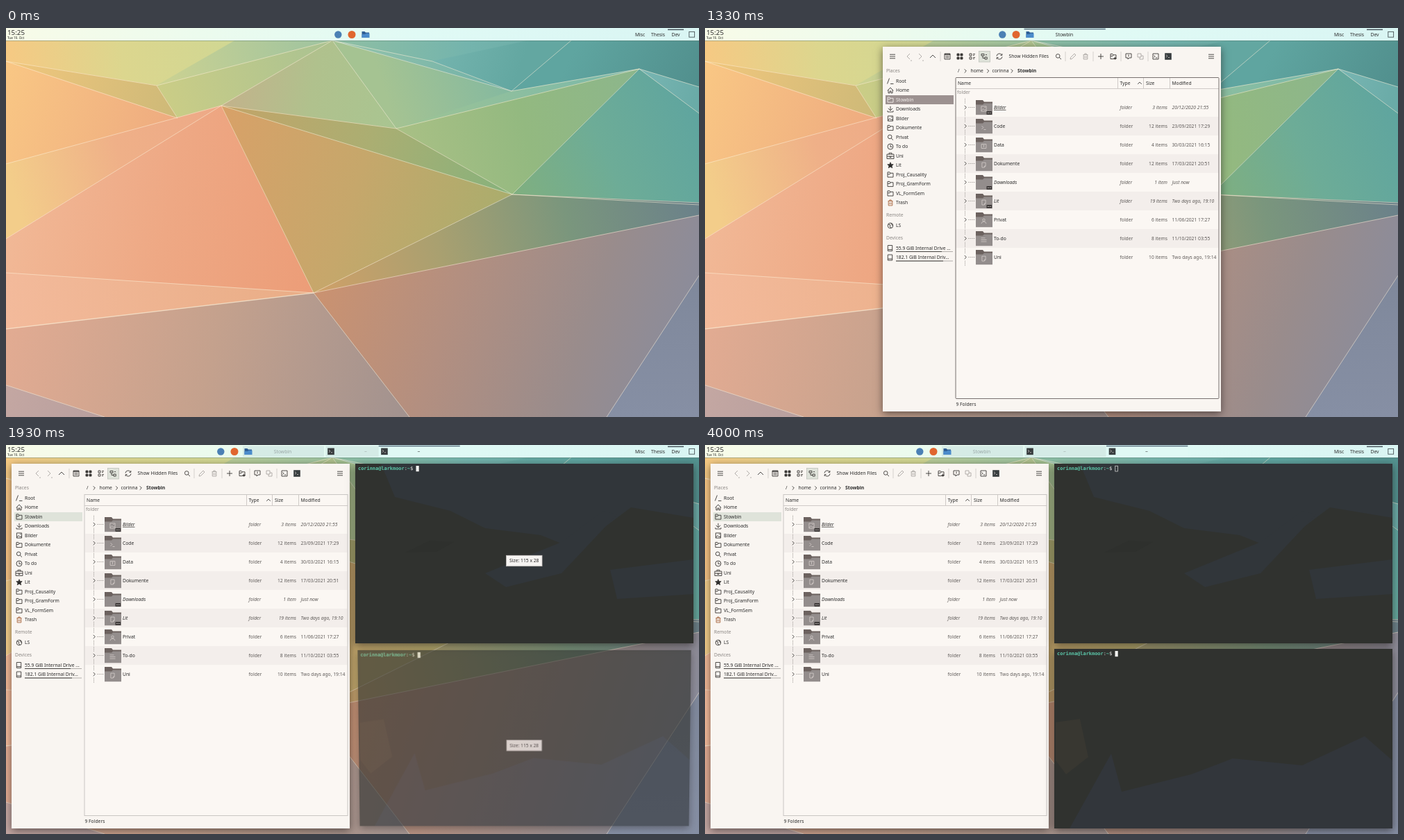
Recreate the animation shown at these times as an HTML page. Size 998x561 px, loop 4.14 s.

```html
<!DOCTYPE html>
<html lang="en">
<head>
<meta charset="utf-8">
<title>Tiling desktop</title>
<style>
  :root {
    --away: perspective(486px) translateZ(-18px) rotateX(-2.6deg);
    --rest: perspective(486px) translateZ(0) rotateX(0deg);
  }
  html, body { margin: 0; width: 100%; height: 100%; overflow: hidden; }
  body { position: relative; background: #b8a080; }
  svg { position: absolute; left: 0; top: 0; width: 100%; height: 100%; display: block; }
  text { font: 6.75px "Noto Sans", "Open Sans", sans-serif; fill: #2b2b2b; white-space: pre; }
  #stage { position: absolute; left: 0; top: 0; width: 998px; height: 561px; overflow: hidden; }
  #panel { height: 19px; }

  .win { position: absolute; width: 487px; box-shadow: 0 3px 11px rgba(30, 25, 25, .6); }
  #files { left: 8px; top: 27px; height: 526px; background: #f9f5f1; }
  .term { left: 503px; height: 259px; background: #30322f; }
  #term1 { top: 27px; }
  #term2 { top: 294px; }
  .term text { font-family: "DejaVu Sans Mono", "Noto Sans Mono", monospace; font-size: 6.93px; fill: #f0f0ee; }
  .term .tip text { font: 6.75px "Noto Sans", sans-serif; fill: #2b2b2b; }
  .user { font-weight: bold; fill: #5cc9ab; }

  .grey { fill: #8b8784; }
  .dim { fill: #5f5b59; }
  .it { font-style: italic; }
  .bold { font-weight: bold; }
  .line { fill: none; stroke: #3a3836; stroke-width: .9; }
  .pale { stroke: #aaa5a2; }
  .glyph { fill: none; stroke: #d6cfcc; stroke-width: .8; }

  /* --on is 1 while a task or window is the active one */
  .on { opacity: var(--on); }
  .off { opacity: calc(1 - var(--on)); }

  #files { --on: 0; animation: files 4140ms linear infinite, focus1 4140ms step-end infinite; }
  #term1 { --on: 0; animation: term1 4140ms linear infinite, focus2 4140ms step-end infinite; }
  #term2 { --on: 1; animation: term2 4140ms linear infinite; }
  #late { animation: late 4140ms step-end infinite; }
  #term1 .tip { animation: tip1 4140ms step-end infinite; }
  #term2 .tip { animation: tip2 4140ms step-end infinite; }
  #strip { animation: strip 4140ms linear infinite; }
  #task0 { --on: 0; animation: open 4140ms step-end infinite, task1 4140ms step-end infinite; }
  #task1 { --on: 0; animation: slide1 4140ms linear infinite, task2 4140ms step-end infinite; }
  #task2 { --on: 1; animation: slide2 4140ms linear infinite; }

  @keyframes files {
    0%, 21.328% { opacity: 0; transform: translateX(248px) var(--away); }
    21.329% { opacity: .4; transform: translateX(248px) var(--away); }
    25.193%, 32.68% { opacity: 1; transform: translateX(248px) var(--rest); }
    32.681%, 100% { opacity: 1; transform: translateX(0) var(--rest); }
  }
  @keyframes term1 {
    0%, 32.68% { opacity: 0; transform: var(--away); }
    32.681% { opacity: .4; transform: var(--away); }
    36.546%, 100% { opacity: 1; transform: var(--rest); }
  }
  @keyframes term2 {
    0%, 44.951% { opacity: 0; transform: var(--away); }
    44.952% { opacity: .4; transform: var(--away); }
    48.816%, 100% { opacity: 1; transform: var(--rest); }
  }
  @keyframes strip {
    0% { transform: translateX(169px); }
    14.493% { transform: translateX(169px); animation-timing-function: ease-out; }
    19.324%, 32.366% { transform: translateX(119px); }
    32.367%, 44.033% { transform: translateX(60px); }
    44.034%, 100% { transform: translateX(0); }
  }
  @keyframes slide1 {
    0%, 32.366% { opacity: 0; transform: translateX(-59px); }
    32.367% { opacity: 1; transform: translateX(-59px); animation-timing-function: cubic-bezier(.25, .46, .45, .94); }
    39.13%, 44.033% { opacity: 1; transform: translateX(59px); }
    44.034%, 100% { opacity: 1; transform: translateX(0); }
  }
  @keyframes slide2 {
    0%, 44.033% { opacity: 0; transform: translateX(-118px); }
    44.034% { opacity: 1; transform: translateX(-118px); animation-timing-function: cubic-bezier(.25, .46, .45, .94); }
    50.797%, 100% { opacity: 1; transform: translateX(0); }
  }
  @keyframes open { 0% { opacity: 0; } 16.9% { opacity: 1; } }
  @keyframes late { 0% { opacity: 0; } 27.295% { opacity: 1; } }
  @keyframes tip1 { 0% { opacity: 1; } 59.66%, 100% { opacity: 0; } }
  @keyframes tip2 { 0% { opacity: 1; } 69.324%, 100% { opacity: 0; } }
  @keyframes task1 { 0% { --on: 1; } 32.367% { --on: 0; } }
  @keyframes task2 { 0% { --on: 1; } 44.034% { --on: 0; } }
  @keyframes focus1 { 0% { --on: 1; } 36.957% { --on: 0; } }
  @keyframes focus2 { 0% { --on: 1; } 48.07% { --on: 0; } }
</style>
</head>
<body>
<div id="stage">
  <svg id="wall" viewBox="0 0 998 561"></svg>
  <div class="win" id="files"><svg viewBox="8 27 487 526"></svg></div>
  <div class="win term" id="term1"><svg viewBox="503 27 487 259"></svg></div>
  <div class="win term" id="term2"><svg viewBox="503 294 487 259"></svg></div>
  <svg id="panel" viewBox="0 0 998 19"></svg>
</div>
<script>
const USER = 'corinna', HOST = 'larkmoor', FOLDER = 'Stowbin';

const fill = (query, html) => { document.querySelector(query).innerHTML = html; };
// Text with its middle at y.
const text = (x, y, s, cls = '', more = '') =>
  `<text x="${x}" y="${y + 2.4}" class="${cls}" ${more}>${s}</text>`;
const rect = (x, y, w, h, color, more = '') =>
  `<rect x="${x}" y="${y}" width="${w}" height="${h}" fill="${color}" ${more}/>`;
const path = (d, cls = 'line', more = '') => `<path d="${d}" class="${cls}" ${more}/>`;
const icon = (x, y, d, cls = 'line', more = '') =>
  path(d, cls, `transform="translate(${x} ${y})" ${more}`);

// Wallpaper: facets between named corners
const corner = {
  a: [310, 112], b: [443, 382], c: [729, 240], d: [562, 145], e: [912, 59], f: [470, 18],
  g: [247, 130], h: [217, 83], i: [0, 48], j: [0, 196], k: [0, 304], l: [0, 353],
  m: [0, 434], n: [0, 515], o: [142, 561], p: [581, 561], q: [865, 561], r: [998, 357],
  s: [998, 270], t: [998, 252], u: [998, 123], v: [998, 85], w: [728, 91], x: [614, 48],
  y: [0, 0], z: [998, 0], A: [998, 561], B: [0, 561], C: [330, 18], D: [835, 0]
};
let shades = 0;
function facet(shape, axis, ...colors) {
  const id = 'shade' + shades++;
  const [[x1, y1], [x2, y2]] = [...axis].map(k => corner[k]);
  const stops = colors.map((c, i) => `<stop offset="${i / (colors.length - 1)}" stop-color="${c}"/>`).join('');
  const points = [...shape].map(k => corner[k]).join(' ');
  return `<linearGradient id="${id}" gradientUnits="userSpaceOnUse" x1="${x1}" y1="${y1}" x2="${x2}" y2="${y2}">${stops}</linearGradient>
    <polygon points="${points}" fill="url(#${id})" stroke="url(#${id})" stroke-width=".6"/>`;
}
const edges = 'aj ak ab ac ad dc de ec bc bs bl bm bp no rq ct ev eu ew fw fd fa ig ih hg hf xw xf wD'
  .split(' ').map(([p, q]) => `M${corner[p]}L${corner[q]}`).join('');

fill('#wall',
  facet('yzAB', 'yz', '#e8d48a', '#a3c79c', '#74b4ad', '#5a9c98') +
  facet('yChi', 'iC', '#f6c983', '#dcd68e', '#d0d793') +
  facet('Cfh', 'hf', '#cdd291', '#9dc3a0') +
  facet('hfag', 'hf', '#cbcd86', '#a9c292') +
  facet('afd', 'ad', '#c3b28b', '#b0c18d', '#a9c591') +
  facet('fwd', 'dw', '#a5c392', '#84b9a0') +
  facet('fxw', 'fw', '#96c4ac', '#6fb0a8') +
  facet('xDw', 'xw', '#74b4ae', '#63a7a1') +
  facet('DzvewD', 'Dv', '#5fa5a0', '#518f8d') +
  facet('dwe', 'de', '#a0c493', '#78b8ac') +
  facet('dec', 'de', '#a9c085', '#93b980', '#8cb68c') +
  facet('ectu', 'cu', '#80af7f', '#6dac97', '#5fa59f') +
  facet('evu', 'ev', '#79b6b3', '#6aaba7') +
  facet('ihg', 'ig', '#f1c77d', '#cdb978') +
  facet('igj', 'ig', '#f9c784', '#eeab80') +
  facet('jak', 'ja', '#f3cd8a', '#efb088', '#eda987') +
  facet('aklb', 'kb', '#f1b896', '#eea884', '#ec9d78') +
  facet('abc', 'ac', '#d8a168', '#c6a76b', '#aaad6d') +
  facet('acd', 'ac', '#c3a468', '#abae72', '#86b27c') +
  facet('bcts', 'bt', '#d0a068', '#a9a070', '#7a967d', '#6b818a') +
  facet('bsAp', 'bA', '#cb9270', '#b38f80', '#998c8c', '#858ca1') +
  facet('rAq', 'rA', '#7f889b', '#868fa4') +
  facet('blm', 'mb', '#f3ba9b', '#e9ad86') +
  facet('bmnop', 'mp', '#e2ab92', '#c4a18d', '#a1928f') +
  facet('noB', 'no', '#c4a7a2', '#b79f9e') +
  path(edges + 'M729 240L998 255', '', 'fill="none" stroke="#fff0d8" stroke-opacity=".52"') +
  path('M0 434L443 382', '', 'fill="none" stroke="#fff0d8" stroke-opacity=".4" stroke-width="1.6"'));

// Small icons drawn around 0,0
const I = {
  root: 'M-4.5 4L-1.5-4M0 4H4.5',
  home: 'M-4.2 .3L0-4L4.2 .3M-3-.6V3.8H-.9V1H.9V3.8H3V-.6',
  folder: 'M-4 3.6V-3.6H-1L0-2.2H4V3.6ZM-4-.6H-.8L0-2.2',
  down: 'M0-4.2V2M-3.2-1.2L0 2L3.2-1.2M-4 2.2V4H4V2.2',
  image: 'M-3.6-3.6H3.6V3.6H-3.6ZM-3.4 3L-1 0L1 2L2 1L3.4 3M1-2H2.4',
  search: 'M2-.6A2.8 2.8 0 1 1-3.6-.6A2.8 2.8 0 1 1 2-.6M1.2 1.4L4 4.2',
  clock: 'M4 0A4 4 0 1 1-4 0A4 4 0 1 1 4 0M0-2.6V.4H2.6',
  brief: 'M-5-2.4H5V4H-5ZM-2-2.4V-4.2H2V-2.4M-5 .6H5M-1 .6V2H1V.6',
  star: 'M0-4.2L1.2-1.3L4.2-1.2L1.9 .8L2.7 3.8L0 2.1L-2.7 3.8L-1.9 .8L-4.2-1.2L-1.2-1.3Z',
  trash: 'M-3.4-2.4H3.4M-2.8-2.4V4H2.8V-2.4M-1.2-2.6V-4H1.2V-2.6M-1-.5V2.4M1-.5V2.4',
  globe: 'M3.8 0A3.8 3.8 0 1 1-3.8 0A3.8 3.8 0 1 1 3.8 0M-3-2L0-1L-1 1L1 3M1-3.4L3 0',
  drive: 'M-3.2-4H3.2V4H-3.2ZM-3.2 2H3.2',
  menu: 'M-4-2.8H4M-4 0H4M-4 2.8H4',
  left: 'M2-4L-2 0L2 4', right: 'M-2-4L2 0L-2 4', up: 'M-4 2L0-2L4 2', next: 'M-1.3-2.6L1.3 0L-1.3 2.6',
  sheet: 'M-4-4H4V4H-4ZM-4-2.6H4M-4-3.3H4M-2.5-.4H2.5M-2.5 1.8H2.5',
  grid: 'M-4-4H-1V-1H-4ZM1-4H4V-1H1ZM-4 1H-1V4H-4ZM1 1H4V4H1Z',
  list: 'M-4-4H-1V-1H-4ZM-4 1H-1V4H-4ZM1-3.4H4M1-1.6H3M1 1.6H4M1 3.4H3',
  tree: 'M-4-3.6H0V-1H-4ZM1 1H4.2V4H1ZM-2-1V2.4H1M2-2.4H4',
  reload: 'M-4-.5A4 4 0 0 1 3.5-2M4 .5A4 4 0 0 1-3.5 2M3.8-4V-1.6H1.4M-3.8 4V1.6H-1.4',
  pen: 'M-4 4L-3.4 1.4L2-4L4-2L-1.4 3.4Z', plus: 'M-4 0H4M0-4V4',
  note: 'M-4-4H4V2H1L-1 4V2H-4ZM0-2.6V.4', copy: 'M-4-4H1V1H-4ZM-1 1V4H4V-1H1',
  shell: 'M-4-4H4V4H-4ZM-2.4-1.6L-.8 0L-2.4 1.6M0 2H2.4',
  page: 'M-2.6-3.4H2.6V1.6L.8 3.6H-2.6ZM2.6 1.6H.8V3.6', prompt: 'M-3-2.4L-.6 0L-3 2.4M0 3H3',
  box: 'M-3.4-3H3.4V3H-3.4ZM-1-1.4H1M0-1.4V1.6', rows: 'M-4-2.6H2M-4 0H4M-4 2.6H4',
  person: 'M1.7-1.7A1.7 1.7 0 1 1-1.7-1.7A1.7 1.7 0 1 1 1.7-1.7M-3.6 3.6L-1.8 .8H1.8L3.6 3.6'
};
const konsole = (x, y) => rect(x - 4.8, y - 4.8, 9.6, 9.6, '#383d3f') +
  icon(x - 1, y - .5, 'M-2-1.8L0 0L-2 1.8M1 2H3', 'glyph', 'stroke-width=".6"');

// File manager
const tools = [[22, 'menu'], [45, 'left', 1], [62, 'right', 1], [80, 'up'], [101, 'sheet'], [119, 'grid'],
  [137, 'list'], [154, 'tree'], [176, 'reload'], [261, 'search'], [282, 'pen', 1], [300, 'trash', 1],
  [322, 'plus'], [340, 'folder'], [362, 'note'], [379, 'copy', 1], [401, 'shell'], [481, 'menu']];
const toolbar = rect(146.5, 33.5, 16, 15.5, '#dfe3da', 'stroke="#b9bcb5" stroke-width=".7"') +
  tools.map(([x, name, off]) => icon(x, 41, I[name], off ? 'line pale' : 'line')).join('') +
  icon(119, 41, I.grid, '', 'fill="#3a3836"') + icon(342.5, 43.5, 'M0-2V2M-2 0H2') + konsole(419, 41) +
  [91, 271, 311, 351, 390].map(x => path(`M${x} 34V48`, 'line pale', 'opacity=".5"')).join('') +
  path('M48 47h2M65 47h2', 'line pale') + text(189.5, 41, 'Show Hidden Files');

const places = [['Root', 'root'], ['Home', 'home'], [FOLDER, 'folder'], ['Downloads', 'down'], ['Bilder', 'image'],
  ['Dokumente', 'folder'], ['Privat', 'search'], ['To do', 'clock'], ['Uni', 'brief'], ['Lit', 'star'],
  ['Proj_Causality', 'folder'], ['Proj_GramForm', 'folder'], ['VL_FormSem', 'folder'], ['Trash', 'trash']];
const place = ([name, kind], i) => {
  const y = 76.5 + 13.5 * i;
  const mark = cls => icon(19, y, I[kind], cls);
  if (i === 2) return `<g class="off">${rect(12, y - 6.5, 98, 13, '#dfe3da')}${mark('line')}${text(27, y, name)}</g>
    <g class="on">${rect(12, y - 6.5, 98, 13, '#9c9190')}${icon(19, y, I[kind], 'line', 'style="stroke:#f6f1ee"')}
    ${text(27, y, name, '', 'style="fill:#f6f1ee"')}</g>`;
  const paint = kind === 'star' ? 'style="fill:#2b2b2b"' : kind === 'trash' ? 'style="stroke:#a5643a"' : '';
  return icon(19, y, I[kind], 'line', paint) + text(27, y, name);
};
const drive = (y, name, used) => icon(18.5, y, I.drive) + text(27, y, name) +
  path(`M27 ${y + 5}H109`, 'line pale') + path(`M27 ${y + 5}H${used}`);
const sidebar = text(13, 62, 'Places', 'grey') + places.map(place).join('') +
  text(13, 270, 'Remote', 'grey') + icon(19, 285, I.globe) + text(27, 285, 'LS') +
  text(13, 303, 'Devices', 'grey') + drive(317.5, '55.9 GiB Internal Drive ...', 93) +
  drive(331, '182.1 GiB Internal Driv...', 95);

const crumbs = text(116, 62, '/') + text(134.5, 62, 'home') + text(165.5, 62, USER) +
  text(202, 62, FOLDER, 'bold') + [127, 159.5, 194].map(x => icon(x, 62, I.next)).join('');

const entries = [
  ['Bilder', '3 items', '20/12/2020 21:55', 'image', 1], ['Code', '12 items', '23/09/2021 17:29', 'prompt'],
  ['Data', '4 items', '30/03/2021 16:15', 'box'], ['Dokumente', '12 items', '17/03/2021 20:51', 'page'],
  ['Downloads', '1 item', 'Just now', '', 1], ['Lit', '19 items', 'Two days ago, 19:10', 'page', 1],
  ['Privat', '6 items', '11/06/2021 17:27', 'person'], ['To-do', '8 items', '11/10/2021 03:55', 'rows'],
  ['Uni', '10 items', 'Two days ago, 19:14', 'page']];
const rowY = i => 114.5 + 27 * i;
const entry = ([name, , date, , link], i) => {
  const y = rowY(i), it = link ? 'it' : '';
  return (i % 2 ? rect(114, y - 13.5, 377.5, 27, '#f3eeeb') : '') +
    path(`M126.5 ${y - 13}V${y - 5}M126.5 ${y + 5}V${y + 13}M131 ${y}H141`, 'line pale', 'stroke-dasharray="1 .6"') +
    icon(127, y, I.next) +
    path(`M142 ${y + 4}V${y - 10.5}H152L154 ${y - 8}H166V${y + 4}Z`, '', 'fill="#6c625f"') +
    path(`M142 ${y + 10.8}V${y - 4}H152L154 ${y - 6}H166V${y + 10.8}Z`, '', 'fill="#938d8c"') +
    text(168, y, name, it, i ? '' : 'text-decoration="underline"') +
    text(349.5, y, 'folder', 'dim ' + it) + text(424.5, y, date, 'dim ' + it);
};
const extras = ([, size, , kind, link], i) => {
  const y = rowY(i);
  return (kind ? icon(153.5, y + 2, I[kind], 'glyph') : '') +
    (link ? rect(157.5, y + 5.5, 7.5, 5, '#3f3b3a') + path(`M159 ${y + 8}h1.8m1 0h1.8`, 'glyph', 'stroke-width="1.2"') : '') +
    text(418, y, size, 'dim ' + (link ? 'it' : ''), 'text-anchor="end"');
};
const view = rect(113, 71.5, 379, 463, '#fbf7f3') +
  text(116, 79.5, 'Name') + text(349.5, 79.5, 'Type') + text(387, 79.5, 'Size') + text(424.5, 79.5, 'Modified') +
  icon(378, 79.5, 'M-2.8 1.4L0-1.4L2.8 1.4') +
  path('M346.5 72V87M383.5 72V87M421.5 72V87M113 87.5H492', 'line pale', 'opacity=".6"') +
  text(115, 93, 'folder', 'grey') + entries.map(entry).join('') +
  `<g id="late">${entries.map(extras).join('')}</g>` +
  rect(113, 71.5, 379, 463, 'none', 'class="off" stroke="#c9c6c3"') +
  rect(113, 71.5, 379, 463, 'none', 'class="on" stroke="#77716f" rx="1"');

fill('#files svg', toolbar + sidebar + crumbs + view + text(113.5, 543, '9 Folders'));

// Terminals
const terminal = (y, tipY, tint) => tint +
  `<text x="507" y="${y + 2.4}"><tspan class="user">${USER}@${HOST}</tspan>:<tspan class="user">~</tspan>$</text>` +
  rect(590.5, y - 4, 4.2, 8.2, '#f3f3f1', 'class="on"') +
  rect(590.8, y - 3.8, 3.6, 7.8, 'none', 'class="off" stroke="#e4e4e2" stroke-width=".7"') +
  `<g class="tip">${rect(720.5, tipY - 7.7, 51.5, 15.4, '#f6f4f2', 'stroke="#c8c4c0" stroke-width=".8"')}
  ${text(746.3, tipY, 'Size: 115 x 28', '', 'text-anchor="middle"')}</g>`;
const tint = (d, color) => path(d, '', `fill="${color}"`);
fill('#term1 svg', terminal(34, 167,
  tint('M540 27H990V105L900 90L820 150L770 130L690 120L640 95L560 75Z', '#31363a') +
  tint('M690 185L800 140L860 95L880 100L800 185L720 205Z', '#31363a') +
  tint('M870 180L990 165V215L880 222Z', '#31363a') +
  tint('M575 155L610 138L645 140L620 154Z', '#2e302d')));
fill('#term2 svg', terminal(301, 433.5,
  tint('M525 553L585 445L600 500L700 475L760 452L860 462L950 420L990 455V553Z', '#32363b') +
  tint('M505 400L540 395L552 450L520 475L505 455Z', '#383731')));

// Panel
const task = (id, x, label, mark, bg) => `<g id="${id}">
  ${rect(x, 0, 117.5, 18, bg)}
  <g class="off">${rect(x + .5, 1.5, 117, 15.5, '#cfe6e2', 'opacity=".75"')}${text(x + 58, 9.5, label, '', 'text-anchor="middle" style="fill:#98a6a4"')}</g>
  <g class="on">${rect(x, .8, 117.3, 1.5, '#5c7584')}${text(x + 58, 9.5, label, '', 'text-anchor="middle"')}</g>
  ${mark}</g>`;
const blueFolder = path('M343.5 14V5H347.5L349 6.5H354V14Z', '', 'fill="#2f5f96"') +
  path('M343.5 14V9H348L349.5 7.8H354.5V14Z', '', 'fill="#4c8ccb"');

fill('#panel', `<linearGradient id="glass"><stop offset="0" stop-color="#f8fbe8"/><stop offset=".3" stop-color="#ebfbee"/>
  <stop offset=".6" stop-color="#e0faf5"/><stop offset="1" stop-color="#d9f5f3"/></linearGradient>` +
  rect(0, 0, 998, 18, 'url(#glass)') + rect(0, 18, 998, .8, '#5d7a70', 'opacity=".55"') +
  text(2, 7.8, '15:25', '', 'style="font-size:9.8px"') +
  text(2, 13.6, 'Tue 19. Oct', '', 'style="font-size:4.6px"') +
  `<g id="strip"><circle cx="309.3" cy="9.5" r="5.2" fill="#4b80b4"/><circle cx="329" cy="9.5" r="5.5" fill="#e0662f"/>
  ${task('task0', 340.5, FOLDER, '', 'none')}${blueFolder}</g>` +
  task('task1', 460, '~', konsole(468, 9.3), '#e3faf4') +
  task('task2', 578, '~', konsole(586.5, 9.3), '#e0f9f5') +
  text(906, 9.5, 'Misc') + text(929, 9.5, 'Thesis') + text(958.5, 9.5, 'Dev') +
  rect(953, 1.6, 23, 1.5, '#46545a') + rect(983.8, 5.4, 7.8, 7.8, 'none', 'stroke="#4a5558" stroke-width=".9"'));
</script>
</body>
</html>
```
